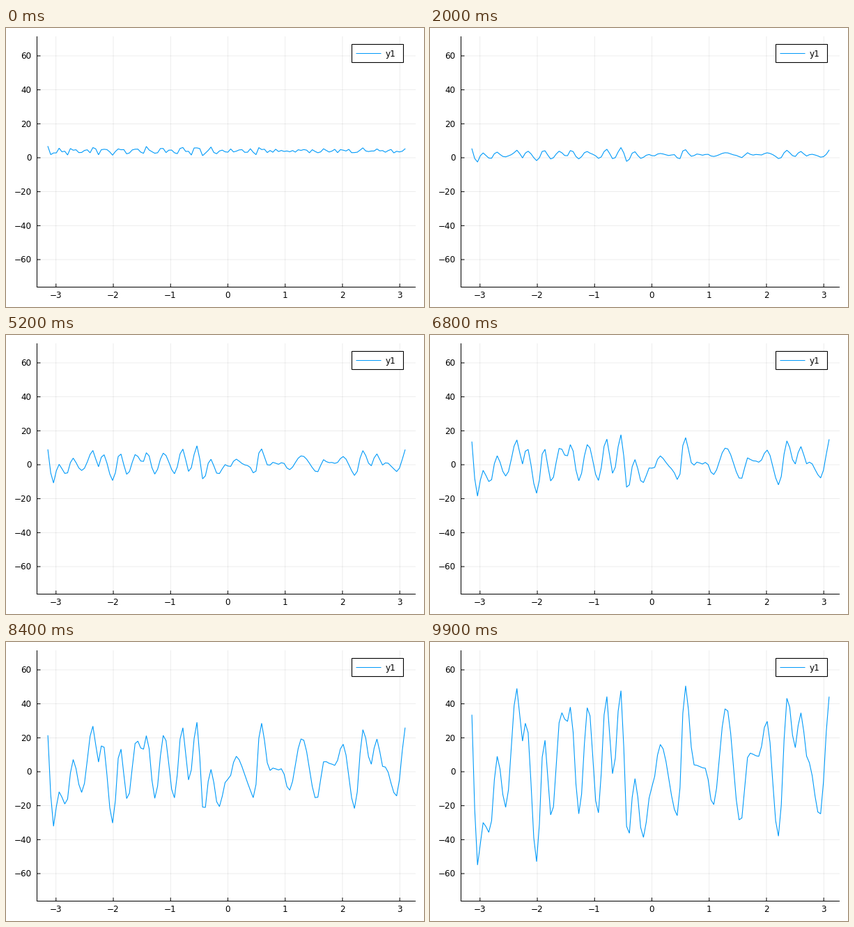
These frames come from a looping animation (600 px wide and 400 px high, 10 s). A matplotlib script:

```python
import numpy as np
import matplotlib.pyplot as plt
from matplotlib.animation import FuncAnimation
from matplotlib.patches import Rectangle

W, H, DPI = 600, 400, 100
FRAMES, INTERVAL = 100, 100
N = 128
BLUE = "#009AF9"
PX = 72 / DPI  # one pixel in points

# Turning points (sample, height) of the fully grown wave
TURNS = [
    (2, -55), (4, -30), (6.3, -36), (9, 9), (12, -21), (16, 49), (18, 18),
    (19.3, 30), (23, -53), (25.7, 20), (28.3, -27), (31.7, 35), (33.8, 29),
    (35, 38), (38.1, -25), (41.3, 39), (44.8, -25), (47.8, 45), (50.2, -2),
    (52.9, 48), (55.5, -40), (57.9, -4), (60.8, -39), (64, -9), (67, 16),
    (73.2, -26), (75.8, 51), (79, 4), (83, 2), (85.7, -20), (90.4, 38),
    (95.5, -30), (98.5, 11), (102, 9), (104.8, 30), (109, -38), (112.2, 44),
    (114.9, 14), (116.8, 35), (119.6, 6), (123.7, -26), (127.4, 46)]


def ease_through(points, at):
    """Periodic curve with cosine easing between turning points."""
    px, py = np.array(points).T
    px = np.r_[px[-1] - N, px, px[0] + N]
    py = np.r_[py[-1], py, py[0]]
    i = np.searchsorted(px, at, side="right") - 1
    u = (at - px[i]) / (px[i + 1] - px[i])
    return py[i] + (py[i + 1] - py[i]) * (1 - np.cos(np.pi * u)) / 2


j = np.arange(N)
x = -np.pi + 2 * np.pi * j / N
k = np.arange(N // 2 + 1)
grown = np.fft.rfft(ease_through(TURNS, j))
noise = np.fft.rfft(np.random.default_rng(4).uniform(-1.7, 1.7, N)) * (k > 26)
growth = np.maximum(0.0485 - 3.4e-5 * k**2, 0.02)  # long waves grow faster


def wave(n):
    """Growing modes over a fading offset and quickly smoothed noise."""
    modes = grown * np.exp(growth * (n - FRAMES + 1))
    grain = noise * np.exp(-6e-5 * k**2 * n)
    return 4 * np.exp(-0.043 * n) + np.fft.irfft(modes + grain, N)


def sx(v):
    return 318.5 + 82.24 * v


def sy(v):
    return 186 - 2.434 * v


fig = plt.figure(figsize=(W / DPI, H / DPI), dpi=DPI, facecolor="white")
ax = fig.add_axes([0, 0, 1, 1])
ax.set_xlim(0, W)
ax.set_ylim(H, 0)
ax.axis("off")

LEFT, RIGHT, TOP, BOTTOM = 44.5, 588, 12, 371.5


def seg(x0, y0, x1, y1, color="black", z=2, width=1, alpha=1):
    ax.plot([x0, x1], [y0, y1], color=color, lw=width * PX, alpha=alpha,
            zorder=z, solid_capstyle="butt", snap=False)


def grid(*ends):
    seg(*ends, z=1, width=0.7, alpha=0.1)


def label(px, py, s, ha):
    ax.text(px, py + 4.3, s, ha=ha, va="baseline", color="black",
            family="DejaVu Sans", size=12 * PX, zorder=6)


def num(v):
    return str(v).replace("-", "\u2212")


for v in range(-3, 4):
    grid(sx(v), TOP, sx(v), BOTTOM)
    seg(sx(v), BOTTOM, sx(v), BOTTOM - 5)
    label(sx(v) - 0.4, 382.8, num(v), "center")
for v in range(-60, 61, 20):
    grid(LEFT, sy(v), RIGHT, sy(v))
    seg(LEFT, sy(v), LEFT + 5, sy(v))
    label(36.6, sy(v), num(v), "right")
seg(LEFT, TOP, LEFT, BOTTOM + 0.5)
seg(LEFT, BOTTOM, RIGHT, BOTTOM)

line, = ax.plot(sx(x), sy(wave(0)), color=BLUE, lw=1.1 * PX, zorder=3,
                solid_joinstyle="miter")

ax.add_patch(Rectangle((496.5, 23.5), 74, 26, fc="white", ec="black",
                       lw=1.1 * PX, zorder=4, snap=False))
seg(502.5, 36.5, 538.5, 36.5, BLUE, 5)
label(544.3, 37, "y1", "left")


def update(n):
    line.set_ydata(sy(wave(n)))
    return line,


anim = FuncAnimation(fig, update, frames=FRAMES, interval=INTERVAL,
                     init_func=lambda: update(0), repeat=True, repeat_delay=0)
plt.show()
```
